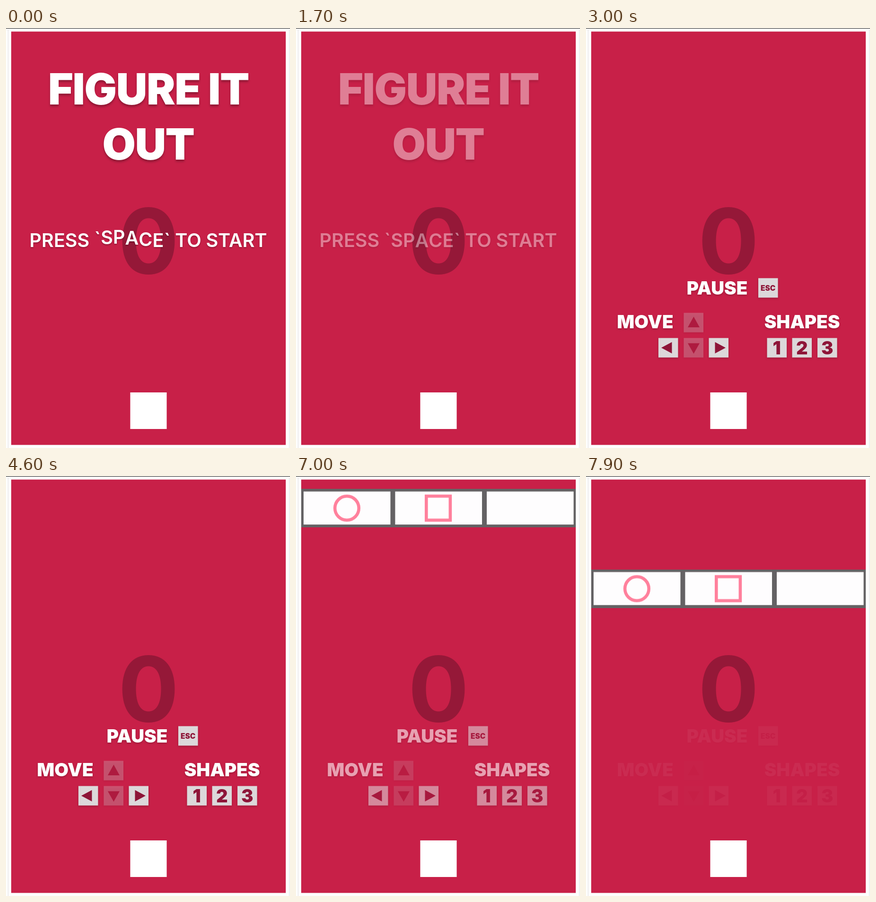
Animation of 600 by 884 pixels, one loop 8000 ms. Source, as an HTML page:

```html
<!DOCTYPE html>
<html lang="en">
<head>
<meta charset="utf-8">
<title>Figure it out</title>
<style>
  html, body { margin: 0; width: 100%; height: 100%; overflow: hidden; background: #fdfdfd; }
  svg { position: absolute; left: 0; top: 0; display: block; }
  svg, .prompt {
    font-family: Inter, sans-serif;
    font-weight: 900;
    font-optical-sizing: none;
  }
  text { text-anchor: middle; }

  .title { font-size: 91px; letter-spacing: -1.5px; fill: #fff; filter: drop-shadow(0 4px 2px rgba(0, 0, 0, .28)); }
  .score { font-size: 190px; font-weight: 700; fill: #951838; }
  .label { font-size: 38.5px; fill: #fff; }
  .key rect { fill: #dcd8da; }
  .key text, .key path { fill: #8e1538; }
  .key text { font-size: 38px; }
  .key .small { font-size: 15.5px; }
  .off { opacity: .28; }

  .prompt {
    position: absolute; left: 0; top: 427.5px; width: 601px;
    font-size: 39.6px; line-height: 1; font-weight: 600;
    text-align: center; white-space: pre; color: #fff;
    text-shadow: 0 2px 3px rgba(0, 0, 0, .28);
  }
  .prompt span {
    display: inline-block;
    animation: hop 8s calc(var(--i) * .14s - .742s) infinite;
  }

  .intro { animation: intro 8s linear infinite; }
  .controls { animation: controls 8s linear infinite; filter: drop-shadow(0 2px 2px rgba(0, 0, 0, .22)); }
  .gate { animation: gate 8s linear infinite; }

  @keyframes hop {
    0% { transform: none; animation-timing-function: cubic-bezier(.37, 0, .63, 1); }
    5.95% { transform: translateY(-7px); animation-timing-function: cubic-bezier(.37, 0, .63, 1); }
    11.9%, 100% { transform: none; }
  }
  @keyframes intro {
    0%, 17.5% { opacity: 1; }
    24%, 100% { opacity: 0; }
  }
  @keyframes controls {
    0%, 23% { opacity: 0; }
    28.75% { opacity: .55; }
    34%, 82.5% { opacity: 1; }
    87.5% { opacity: .58; }
    93.5% { opacity: .06; }
    100% { opacity: .05; }
  }
  @keyframes gate {
    0%, 80% { transform: translateY(-86px); }
    100% { transform: translateY(215.3px); }
  }
</style>
</head>
<body>
<svg width="600" height="884" viewBox="0 0 600 884">
  <defs>
    <clipPath id="panel"><rect x="11" y="7.5" width="580" height="870"/></clipPath>
  </defs>
  <rect width="600" height="1" fill="#111"/>
  <path d="M4.5 2V884M598.5 2V884" stroke="#e2e0e1"/>
  <rect x="11" y="7.5" width="580" height="870" fill="#c82048"/>
  <text class="score" x="301" y="516.5">0</text>

  <g class="intro title">
    <text x="301" y="161">FIGURE IT</text>
    <text x="300.5" y="277">OUT</text>
  </g>

  <g class="controls">
    <g class="label">
      <text x="277" y="561">PAUSE</text>
      <text x="125" y="632">MOVE</text>
      <text x="456.5" y="632">SHAPES</text>
    </g>
    <g class="key" transform="translate(364 526.5)">
      <rect width="41.5" height="41"/><text class="small" x="20.7" y="26">ESC</text>
    </g>
    <g class="key off" transform="translate(206.5 599.5)">
      <rect width="41.5" height="41"/><path d="M8.5 30.5h25L21 8z"/>
    </g>
    <g class="key off" transform="translate(206.5 652.5)">
      <rect width="41.5" height="41"/><path d="M8.5 11h25L21 33z"/>
    </g>
    <g class="key" transform="translate(153 652.5)">
      <rect width="41.5" height="41"/><path d="M6 20.5L28.5 8.5v24z"/>
    </g>
    <g class="key" transform="translate(259.5 652.5)">
      <rect width="41.5" height="41"/><path d="M35.5 20.5L13 8.5v24z"/>
    </g>
    <g class="key" transform="translate(382.5 652.5)">
      <rect width="41.5" height="41"/><text x="20.7" y="34.3">1</text>
    </g>
    <g class="key" transform="translate(435.5 652.5)">
      <rect width="41.5" height="41"/><text x="20.7" y="34.3">2</text>
    </g>
    <g class="key" transform="translate(489 652.5)">
      <rect width="41.5" height="41"/><text x="20.7" y="34.3">3</text>
    </g>
  </g>

  <g clip-path="url(#panel)">
    <g class="gate">
      <rect x="11" width="580" height="81" fill="#646264"/>
      <path d="M16 5.5h183.5v69.5h-183.5zM209.5 5.5h183.5v69.5h-183.5zM403 5.5h183.5v69.5h-183.5z" fill="#fefdfe"/>
      <g fill="none" stroke="#ff809c" stroke-width="6.6">
        <circle cx="107.5" cy="40.5" r="25.3"/>
        <rect x="275.3" y="15.2" width="50.6" height="50.6"/>
      </g>
    </g>
  </g>
  <rect x="262.5" y="767" width="77" height="77" fill="#fff"/>
</svg>
<div class="prompt intro">PRESS <span style="--i:0">`</span><span style="--i:1">S</span><span style="--i:2">P</span><span style="--i:3">A</span><span style="--i:4">C</span><span style="--i:5">E</span><span style="--i:6">`</span> TO START</div>
</body>
</html>
```
